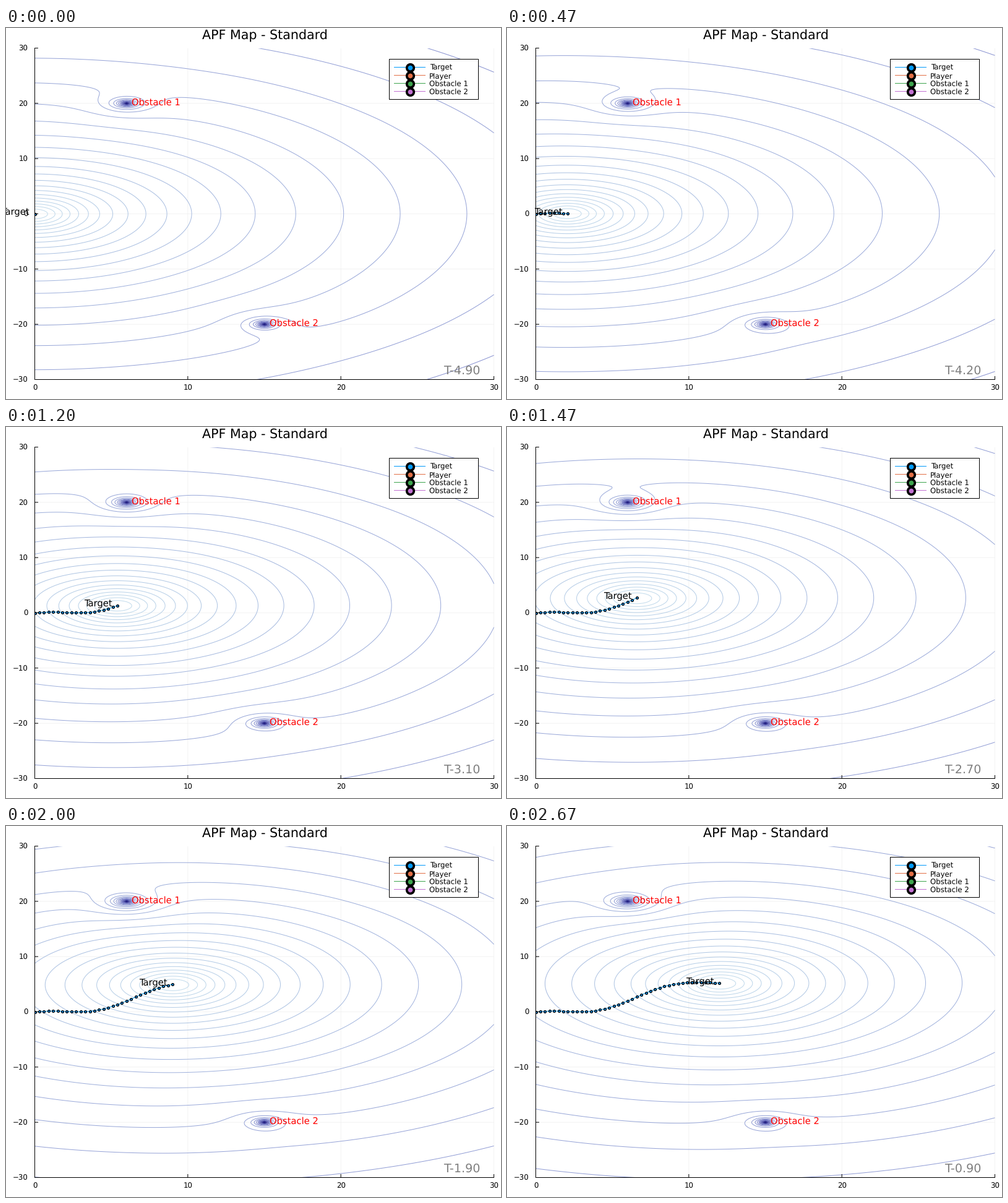
Animation, 800 px wide and 600 px high, one loop 2.74 s. Source, as a matplotlib script:

```python
import numpy as np
import matplotlib.pyplot as plt
from matplotlib.animation import FuncAnimation
from matplotlib.colors import LinearSegmentedColormap
from matplotlib.lines import Line2D
from matplotlib.patches import Rectangle

W, H, DPI = 800, 600, 100
LEFT, RIGHT, TOP, BOTTOM = 46.5, 788.5, 32.5, 568.5
STEPS, LOOP_MS, TICK_MS = 41, 2740, 20
STEP_MS = 200 / 3
PT = 72 / DPI  # points per pixel

BLUE, ORANGE, GREEN, PURPLE = "#009afa", "#e26f46", "#3da44d", "#c271d2"
OBSTACLES = [(6, 20, GREEN), (15, -20, PURPLE)]
REPULSION, SOFTENING, LEVELS = 500, 0.0082, 30
SHADES = LinearSegmentedColormap.from_list("shades", [
    (0.00, (0.77, 0.87, 0.93)),
    (0.30, (0.68, 0.77, 0.89)),
    (0.60, (0.58, 0.63, 0.84)),
    (0.75, (0.42, 0.44, 0.76)),
    (1.00, (0.08, 0.06, 0.46)),
])

plt.rcParams.update({"font.family": "DejaVu Sans", "path.snap": False,
                     "text.hinting": "none"})
fig = plt.figure(figsize=(W / DPI, H / DPI), dpi=DPI, facecolor="white")
ax = fig.add_axes([LEFT / W, 1 - BOTTOM / H, (RIGHT - LEFT) / W, (BOTTOM - TOP) / H])
ax.set(xlim=(0, 30), ylim=(-30, 30), xticks=[], yticks=[])
for side in ("top", "right"):
    ax.spines[side].set_visible(False)
for side in ("left", "bottom"):
    ax.spines[side].set_linewidth(1 * PT)


def px(x):
    return LEFT + (RIGHT - LEFT) * x / 30


def py(y):
    return (TOP + BOTTOM) / 2 - (BOTTOM - TOP) * y / 60


def text(x, y, s, size, color="black", ha="left"):
    """Text with its baseline at pixel (x, y), y counted from the top."""
    return fig.text(x / W, 1 - y / H, s, fontsize=size * PT, color=color,
                    ha=ha, va="baseline", zorder=10)


def line(x0, y0, x1, y1, color, width, z):
    fig.add_artist(Line2D([x0 / W, x1 / W], [1 - y0 / H, 1 - y1 / H],
                          color=color, lw=width * PT, zorder=z))


def dots(x, y, color, z):
    return ax.scatter(x, y, s=(3.8 * PT)**2, facecolor=color, edgecolor="black",
                      linewidth=1.3 * PT, zorder=z)


def draw_axes():
    for v in (0, 10, 20, 30):
        x = px(v)
        if 0 < v:
            ax.axvline(v, color="#f0f0f0", lw=0.8 * PT, zorder=0)
        line(x, BOTTOM, x, BOTTOM - 5, "black", 1, 5)
        text(x, 586, str(v), 11.8, ha="center")
    for v in range(-30, 31, 10):
        y = py(v)
        if -30 < v:
            ax.axhline(v, color="#f0f0f0", lw=0.8 * PT, zorder=0)
        line(LEFT, y, LEFT + 5, y, "black", 1, 5)
        text(35.5, y + 4.5, str(v).replace("-", "\u2212"), 11.8, ha="right")


def draw_legend():
    fig.add_artist(Rectangle((619.5 / W, 1 - 115.5 / H), 144 / W, 65 / H, fc="white",
                             ec="black", lw=1 * PT, zorder=7))
    entries = [("Target", BLUE, 685.5), ("Player", ORANGE, 683.5),
               ("Obstacle 1", GREEN, 684.3), ("Obstacle 2", PURPLE, 684.3)]
    for i, (name, color, x) in enumerate(entries):
        y = 63.5 + 13 * i
        line(627.5, y, 677.5, y, color, 1, 8)
        fig.add_artist(Line2D([652.5 / W], [1 - y / H], marker="o", ms=11.5 * PT, mfc=color,
                              mec="black", mew=3.7 * PT, ls="none", zorder=9))
        text(x, y + 4.5, name, 11.8)


def target_path():
    """The target runs at constant speed in x; y is a smooth curve through knots."""
    knots = np.array([0, .15, .03, .09, .76, 1.96, 3.42, 4.59, 5.21, 5.32, 5.21])
    slope = np.gradient(knots)
    u = np.arange(STEPS) / 4
    i = np.minimum(u.astype(int), len(knots) - 2)
    t = u - i
    y = ((2 * t**3 - 3 * t**2 + 1) * knots[i] + (t**3 - 2 * t**2 + t) * slope[i]
         + (3 * t**2 - 2 * t**3) * knots[i + 1] + (t**3 - t**2) * slope[i + 1])
    return 0.3 * np.arange(STEPS), y


draw_axes()
draw_legend()
text((LEFT + RIGHT) / 2 + 1, 18.5, "APF Map - Standard", 20.7, ha="center")
for n, (ox, oy, color) in enumerate(OBSTACLES, 1):
    dots([ox], [oy], color, 1)
    text(px(ox) + 8.5, py(oy) + 2.5, f"Obstacle {n}", 14.8, "red")

path_x, path_y = target_path()
trail, = ax.plot([], [], color=BLUE, lw=1 * PT, zorder=6)
trail_dots = dots([], [], BLUE, 6)
label = text(0, 0, "Target", 14.8, ha="right")
clock = text(707, 559.5, "", 19.2, "gray")

gx, gy = np.meshgrid(np.linspace(0, 30, 151), np.linspace(-30, 30, 301))
repulsion = sum(REPULSION / ((gx - ox)**2 + (gy - oy)**2 + SOFTENING)
                for ox, oy, _ in OBSTACLES)
shown = {"step": None, "contour": None}


def show_step(k):
    if shown["contour"]:
        shown["contour"].remove()
    tx, ty = path_x[k], path_y[k]
    field = np.log((gx - tx)**2 + (gy - ty)**2 + repulsion)
    low, high = field.min(), field.max()
    shown["contour"] = ax.contour(
        gx, gy, field, levels=np.linspace(low, high, LEVELS + 2)[1:-1],
        cmap=SHADES, vmin=low, vmax=high, linewidths=1 * PT, zorder=2)
    trail.set_data(path_x[:k + 1], path_y[:k + 1])
    trail_dots.set_offsets(np.column_stack([path_x, path_y])[:k + 1])
    label.set_position(((px(tx) - 8.5) / W, 1 - (py(ty) + 2.5) / H))
    clock.set_text(f"T-{4.9 - 0.1 * k:.2f}")


def update(tick):
    # Sample mid-tick, so each step starts on the nearest tick.
    k = min(int((tick + 0.5) * TICK_MS / STEP_MS), STEPS - 1)
    if k != shown["step"]:
        show_step(k)
        shown["step"] = k
    return []


anim = FuncAnimation(fig, update, frames=LOOP_MS // TICK_MS, interval=TICK_MS,
                     repeat=True, repeat_delay=0, blit=False)
plt.show()
```
